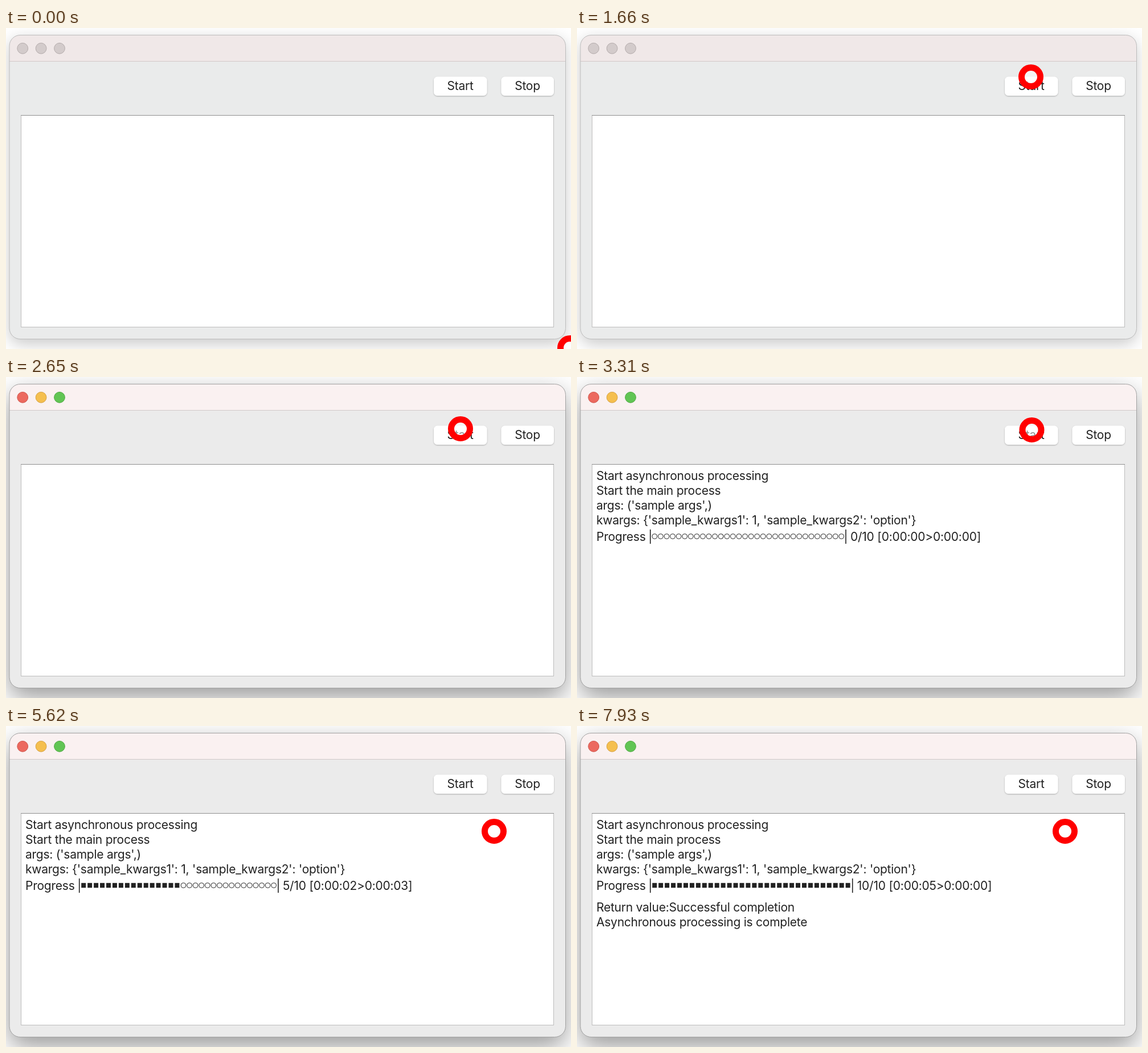
An HTML page that plays this animation: 992x564 px, repeating every 8 s.

```html
<!DOCTYPE html>
<html lang="en">
<head>
<meta charset="utf-8">
<title>Asynchronous processing</title>
<style>
  html, body { margin: 0; width: 100%; height: 100%; overflow: hidden; background: #fff; }
  svg { display: block; width: 992px; height: 564px; }
  text { font: 21px Inter, "Noto Sans", sans-serif; letter-spacing: -0.24px; fill: #222; white-space: pre; }
  .caption { text-anchor: middle; }
</style>
</head>
<body>
<svg viewBox="0 0 992 564" xmlns="http://www.w3.org/2000/svg">
  <defs>
    <filter id="blurActive" x="-20%" y="-30%" width="140%" height="160%"><feGaussianBlur stdDeviation="22"/></filter>
    <filter id="blurIdle" x="-20%" y="-30%" width="140%" height="160%"><feGaussianBlur stdDeviation="14"/></filter>
    <filter id="buttonShadow" x="-10%" y="-20%" width="120%" height="150%">
      <feDropShadow dx="0" dy="1" stdDeviation="0.8" flood-opacity="0.28"/>
    </filter>
    <clipPath id="windowClip"><rect x="6" y="12.5" width="976.5" height="534" rx="19"/></clipPath>
  </defs>

  <rect id="shadowIdle" x="6" y="20" width="976" height="535" rx="19" opacity="0.21" filter="url(#blurIdle)"/>
  <rect id="shadowActive" x="6" y="28" width="976" height="535" rx="19" opacity="0.4" filter="url(#blurActive)"/>

  <g clip-path="url(#windowClip)">
    <rect id="body" x="6" y="12" width="977" height="536"/>
    <rect id="titleBar" x="6" y="12" width="977" height="46"/>
    <rect id="divider" x="6" y="58" width="977" height="1"/>
  </g>
  <rect id="outline" x="6" y="12.5" width="976.5" height="534" rx="19" fill="none"/>
  <g id="lights"></g>

  <g fill="#fff" filter="url(#buttonShadow)">
    <rect x="751" y="85.5" width="93.5" height="33.5" rx="6.5"/>
    <rect x="869.5" y="85.5" width="92.5" height="33.5" rx="6.5"/>
  </g>
  <text class="caption" x="797.5" y="109">Start</text>
  <text class="caption" x="915.5" y="109">Stop</text>

  <rect x="26.5" y="153.5" width="935" height="372" fill="#fff" stroke="#bdbdbd"/>
  <path d="M26 153.5H962" stroke="#8f8f8f"/>

  <g id="log">
    <text x="34" y="181">Start asynchronous processing</text>
    <text x="34" y="207">Start the main process</text>
    <text x="34" y="233">args: ('sample args',)</text>
    <text x="34" y="259">kwargs: {'sample_kwargs1': 1, 'sample_kwargs2': 'option'}</text>
    <text x="34" y="287.5">Progress</text>
    <text class="caption" x="128.5" y="287.5">|</text>
    <g id="bar"></g>
    <text id="barEnd" class="caption" y="287.5">|</text>
    <text id="counter" y="287.5"></text>
  </g>
  <g id="result">
    <text x="34" y="326">Return value:Successful completion</text>
    <text x="34" y="352">Asynchronous processing is complete</text>
  </g>

  <g id="pointer">
    <circle r="12" fill="#fff" fill-opacity="0.5"/>
    <circle r="16.5" fill="none" stroke="#f00" stroke-width="11"/>
  </g>
</svg>
<script>
const LOOP = 8000, ACTIVATE = 1990, LOG_START = 3310;
const CELLS = 32, STEPS = 10, STEP_SECONDS = 0.51;
const BAR_X = 131, BAR_Y = 280, SQUARE_PITCH = 10.95, CIRCLE_PITCH = 10.58;

// Each pointer stop: time, x, y
const pointerStops = [
  [0, 990, 562], [1000, 906, 379], [1330, 820, 154], [1660, 797, 86],
  [2650, 798, 91], [2980, 798.5, 93], [3640, 807, 127], [3970, 871, 174], [4300, 857, 185]
];
const stepTimes = [3640, 4300, 4630, 4960, 5620, 5950, 6610, 6940, 7270, 7930];
const lightColors = [["#ec695f", "#cf544b"], ["#f5bf4f", "#d5a141"], ["#61c554", "#4da63f"]];

const $ = id => document.getElementById(id);
const set = (node, attrs) => {
  for (const key in attrs) node.setAttribute(key, attrs[key]);
  return node;
};
const add = (parent, tag, attrs) =>
  parent.appendChild(set(document.createElementNS("http://www.w3.org/2000/svg", tag), attrs));
const show = (id, on) => set($(id), { visibility: on ? "visible" : "hidden" });

const lights = lightColors.map((_, i) =>
  add($("lights"), "circle", { cx: 29.2 + 32.4 * i, cy: 35.8, r: 9.4 }));
const cells = Array.from({ length: CELLS }, () => ({
  square: add($("bar"), "rect", { y: BAR_Y - 4.2, width: 8, height: 8.4, fill: "#222" }),
  circle: add($("bar"), "circle", { cy: BAR_Y, r: 4.3, fill: "none", stroke: "#333", "stroke-width": 1.1 })
}));

const clock = seconds => "0:00:0" + seconds;

function drawWindow(active) {
  show("shadowIdle", !active);
  show("shadowActive", active);
  set($("body"), { fill: active ? "#ebebeb" : "#eaebeb" });
  set($("titleBar"), { fill: active ? "#faf1f1" : "#f0e8e8" });
  set($("divider"), { fill: active ? "#d0c9c9" : "#d3c8c8" });
  set($("outline"), { stroke: active ? "#a2a2a2" : "#bcbcbc" });
  lights.forEach((light, i) => {
    const [fill, stroke] = active ? lightColors[i] : ["#d3cbcb", "#b3abab"];
    set(light, { fill, stroke });
  });
}

function drawProgress(step) {
  const filled = Math.floor(CELLS * step / STEPS);
  let x = BAR_X;
  cells.forEach(({ square, circle }, i) => {
    const full = i < filled;
    set(square, { x: x + 1.2, display: full ? "inline" : "none" });
    set(circle, { cx: x + CIRCLE_PITCH / 2, display: full ? "none" : "inline" });
    x += full ? SQUARE_PITCH : CIRCLE_PITCH;
  });
  const elapsed = Math.floor(step * STEP_SECONDS);
  const left = step ? Math.ceil((STEPS - step) * STEP_SECONDS) : 0;
  set($("barEnd"), { x: x + 2.3 });
  set($("counter"), { x: x + 10.4 }).textContent =
    `${step}/${STEPS} [${clock(elapsed)}>${clock(left)}]`;
}

function render(t) {
  drawWindow(t >= ACTIVATE);
  const step = stepTimes.filter(time => time <= t).length;
  drawProgress(step);
  show("log", t >= LOG_START);
  show("result", step === STEPS);
  const [, x, y] = pointerStops.filter(([time]) => time <= t).pop();
  set($("pointer"), { transform: `translate(${x} ${y})` });
}

const start = performance.now();
function tick() {
  render((performance.now() - start) % LOOP);
  requestAnimationFrame(tick);
}
tick();
</script>
</body>
</html>
```
